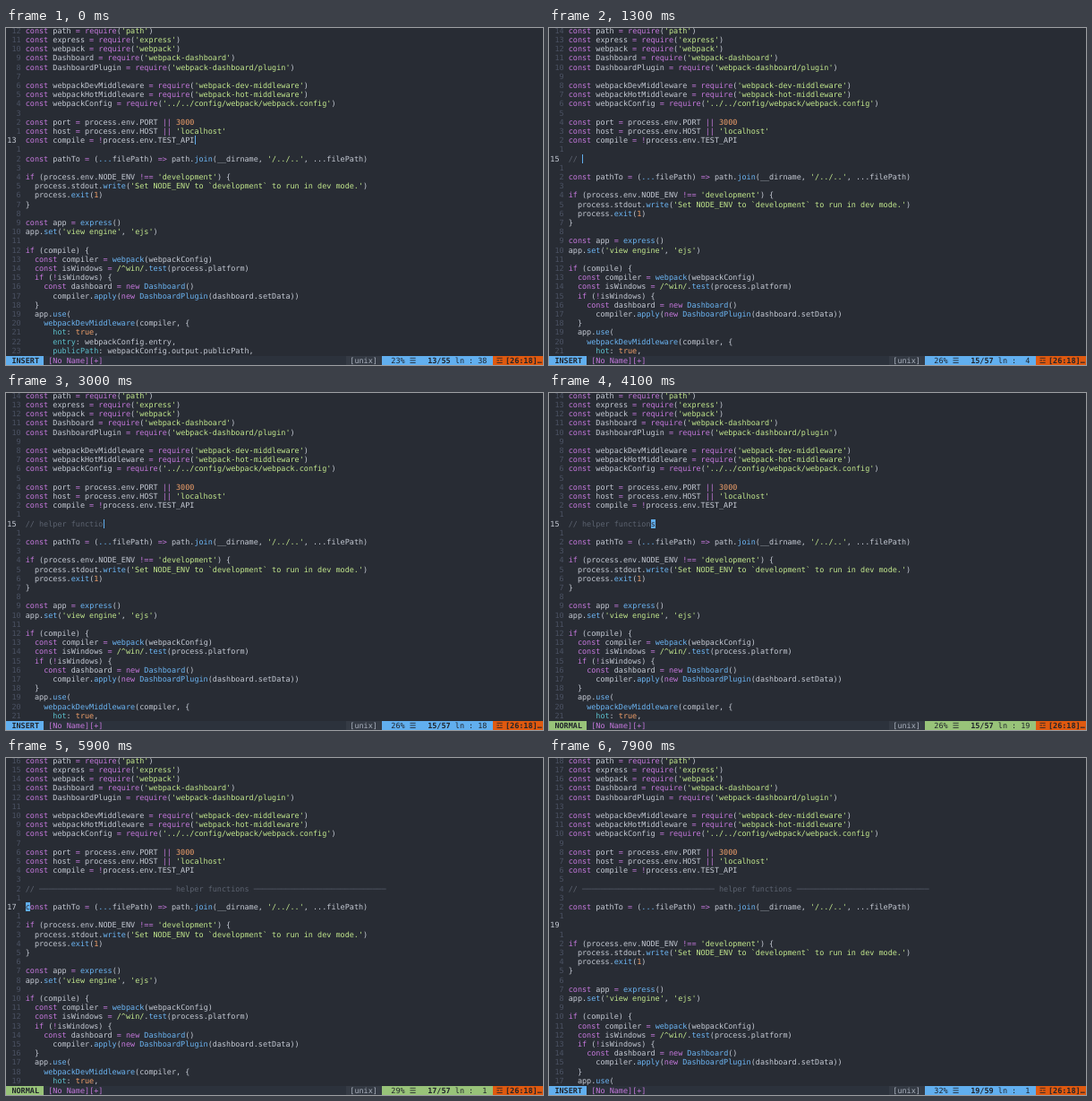
Write an HTML page that moves like this. It is 600 by 376 pixels and loops after 8 s.

```html
<!DOCTYPE html>
<html lang="en">
<head>
<meta charset="utf-8">
<title>Editor</title>
<style>
  html, body { margin: 0; width: 100%; height: 100%; overflow: hidden; background: #282c34; }
  #stage {
    position: relative; width: 600px; height: 376px; overflow: hidden;
    background: #282c34; color: #c5cad4;
    font: 8.48px/10.2px "DejaVu Sans Mono", "Liberation Mono", monospace;
    text-rendering: geometricPrecision; font-variant-ligatures: none;
  }
  #stage div { position: absolute; white-space: pre; height: 10.2px; }
  .num { color: #4b5263; }
  .now { color: #c5cad4; }
  .key { color: #c678dd; }
  .str { color: #c3e88d; }
  .lit { color: #f0a06a; }
  .fn { color: #6cb6f5; }
  .prop { color: #5cc0cc; }
  .note { color: #5c6370; }
  #stage .pair { color: #e8793a; background: #282c34; box-shadow: inset 0 -1px #e8793a; }
  #stage .bar { top: 365.5px; height: 10.5px; line-height: 10.8px; color: #20242b; }
  .bold { font-weight: bold; }
  .sign { font-family: "DejaVu Sans", sans-serif; }
</style>
</head>
<body>
<div id="stage"></div>
<script>
const stage = document.getElementById('stage');
const LOOP = 8000, CELL = 5.107, ROW = 10.2, LEFT = 1.3, TOP = -2.2, GUTTER = 4;
const BLUE = '#61afef', GREEN = '#98c379', ORANGE = '#e0590f';
const NOTE = '// helper functions';
const rule = '─'.repeat(29);
const RULED = `// ${rule} helper functions ${rule}`;

const head = `const path = require('path')
const express = require('express')
const webpack = require('webpack')
const Dashboard = require('webpack-dashboard')
const DashboardPlugin = require('webpack-dashboard/plugin')

const webpackDevMiddleware = require('webpack-dev-middleware')
const webpackHotMiddleware = require('webpack-hot-middleware')
const webpackConfig = require('../../config/webpack/webpack.config')

const port = process.env.PORT || 3000
const host = process.env.HOST || 'localhost'
const compile = !process.env.TEST_API`.split('\n');

const middle = ['', "const pathTo = (...filePath) => path.join(__dirname, '/../..', ...filePath)"];

const tail = `
if (process.env.NODE_ENV !== 'development') {
  process.stdout.write('Set NODE_ENV to \`development\` to run in dev mode.')
  process.exit(1)
}

const app = express()
app.set('view engine', 'ejs')

if (compile) {
  const compiler = webpack(webpackConfig)
  const isWindows = /^win/.test(process.platform)
  if (!isWindows) {
    const dashboard = new Dashboard()
      compiler.apply(new DashboardPlugin(dashboard.setData))
  }
  app.use(
    webpackDevMiddleware(compiler, {
      hot: true,
      entry: webpackConfig.entry,
      publicPath: webpackConfig.output.publicPath,`.split('\n');

// Each step: time, mode, line, column, lines added above and below the helper
const steps = [
  [0, 'INSERT', 13, 38, [], 0],
  [400, 'INSERT', 14, 1, [''], 0],
  [800, 'INSERT', 15, 1, ['', ''], 0],
];
const typed = n => n < 4 ? 900 + n * 100 : 1500 + (n - 3) * 105;
for (let n = 1; n <= NOTE.length; n++) {
  steps.push([typed(n), 'INSERT', 15, n + 1, ['', NOTE.slice(0, n)], 0]);
}
const ruled = ['', RULED];
steps.push(
  [3700, 'NORMAL', 15, 19, ['', NOTE], 0],
  [4400, 'NORMAL', 15, 1, ruled, 0],
  [5700, 'NORMAL', 16, 1, ruled, 0],
  [5900, 'NORMAL', 17, 1, ruled, 0],
  [6400, 'INSERT', 17, 76, ruled, 0],
  [7000, 'INSERT', 18, 1, ruled, 1],
  [7200, 'INSERT', 19, 1, ruled, 2],
  [7600, 'INSERT', 19, 0, ruled, 2],
);

const syntax = [
  ['note', /^\/\/.*/],
  ['str', /'[^']*'|\/\^win\//],
  ['key', /\b(?:const|if|new|require)\b|=>|!==|\|\||=|!/],
  ['lit', /\b(?:\d+|true)\b/],
  ['prop', /\w+(?=:)/],
  ['fn', /\w+(?=\()|(?<=\()\.\.\./],
];
const lexer = new RegExp(syntax.map(([name, re]) => `(?<${name}>${re.source})`).join('|'), 'g');

function paint(text) {
  return text.replace(lexer, (token, ...rest) => {
    const groups = rest[rest.length - 1];
    const name = Object.keys(groups).find(k => groups[k] !== undefined);
    return `<span class="${name}">${token}</span>`;
  });
}

const colX = col => LEFT + col * CELL;
const rowY = line => TOP + (line - 1) * ROW;

function box(x, y, html, cls = '', style = '') {
  return `<div class="${cls}" style="left:${x.toFixed(2)}px;top:${y.toFixed(2)}px;${style}">${html}</div>`;
}

function barText(col, text, cls = '', style = '') {
  return `<div class="bar ${cls}" style="left:${colX(col).toFixed(2)}px;${style}">${text}</div>`;
}

function barFill(from, to, color) {
  return `<div class="bar" style="left:${from}px;width:${to - from}px;background:${color}"></div>`;
}

function statusBar(mode, line, col, total) {
  const tint = mode === 'INSERT' ? BLUE : GREEN;
  const percent = Math.floor(line / total * 100);
  return barFill(0, 600, '#2c323c') + barFill(0, 42, tint) + barFill(380, 420, '#353b45') +
    barFill(420, 543.5, tint) + barFill(543.5, 600, ORANGE) +
    barText(1, mode, 'bold') +
    barText(9, '[No Name][+]', '', 'color:#c678dd') +
    barText(75, '[unix]', '', 'color:#abb2bf') +
    barText(84, percent + '%') +
    barText(88, '☰', 'sign') +
    barText(92, `${line}/${total}`, 'bold') +
    barText(98, `ln :${String(Math.max(col, 1)).padStart(3)}`) +
    barText(107, '☲', 'sign bold') +
    barText(109, '[26:18]…', 'bold');
}

function cursor(mode, line, col, text) {
  if (!col) return '';
  const x = colX(GUTTER + col - 1), y = rowY(line);
  return mode === 'INSERT'
    ? box(x, y, '', '', `width:1.3px;background:${BLUE}`)
    : box(x, y, text[col - 1] || ' ', '', `width:${CELL}px;background:${BLUE};color:#282c34`);
}

function draw([, mode, line, col, above, below]) {
  const lines = [...head, ...above, ...middle, ...Array(below).fill(''), ...tail].slice(0, 36);
  let html = '';
  lines.forEach((text, i) => {
    const n = i + 1, away = Math.abs(n - line);
    html += away
      ? box(LEFT, rowY(n), String(away).padStart(3), 'num')
      : box(LEFT, rowY(n), n, 'now');
    html += box(colX(GUTTER), rowY(n), paint(text));
  });
  if (col === 76) {
    html += box(colX(GUTTER + 41), rowY(line), '(', 'pair') + box(colX(GUTTER + 74), rowY(line), ')', 'pair');
  }
  html += cursor(mode, line, col, lines[line - 1]);
  html += statusBar(mode, line, col, 55 + above.length + below);
  stage.innerHTML = html;
}

let shown = null;
function tick() {
  const t = performance.now() % LOOP;
  const step = steps.filter(s => s[0] <= t).pop();
  if (step !== shown) draw(shown = step);
  requestAnimationFrame(tick);
}
tick();
</script>
</body>
</html>
```
